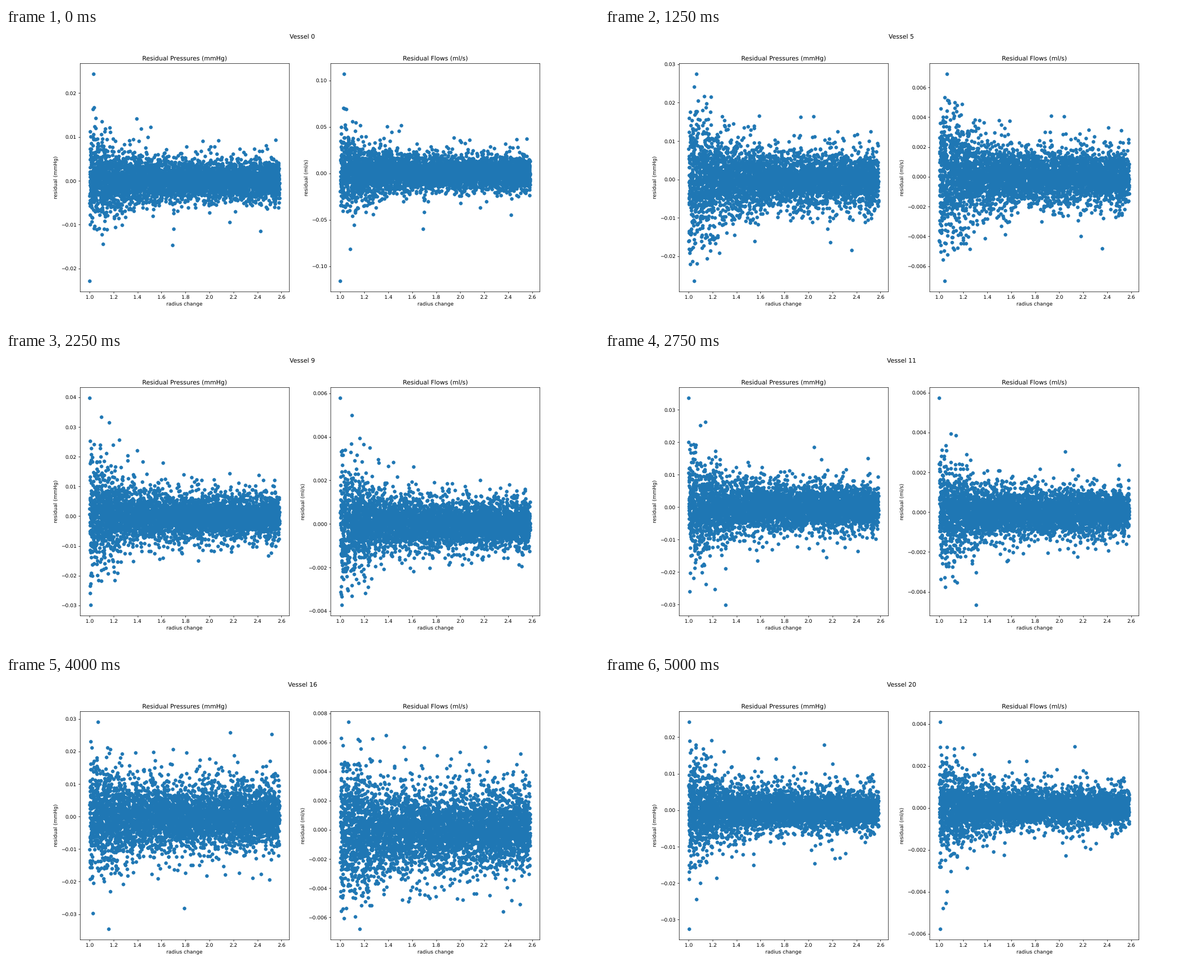
Recreate the animation shown at these times as a matplotlib script. Size 1058 by 529 pixels, loop 5250 ms.

```python
import numpy as np
import matplotlib.pyplot as plt
from matplotlib.animation import FuncAnimation

plt.rcParams["text.hinting"] = "no_hinting"

VESSELS = 21
POINTS = 4500
X_MAX = 2.5845
SCALES = {"p": 1e-4, "f": 1e-5}  # mmHg and ml/s per unit below

# Key vessels; every quantity runs geometrically between them.
KEYS = [0, 2, 5, 9, 13, 16, 20]
SPREAD_P = [19, 22, 29, 32, 27, 41, 23]
SPREAD_F = [800, 98, 75, 47, 50, 118, 37]
FLARE = [1.5, 0.8, 1.9, 1.6, 1.8, 0.9, 1.8]
# highest and lowest point as (x, pressure, flow)
HIGH = [(1.03, 244, 10710), (1.76, 184.5, 880), (1.063, 275, 690), (1.0, 398, 579),
        (1.0, 284, 568), (1.07, 291, 742), (1.005, 242, 410)]
LOW = [(1.0, -229, -11610), (2.32, -270, -1208), (1.045, -265, -700), (1.01, -299, -373),
       (1.695, -304, -583), (1.16, -346, -682), (1.005, -326, -578)]


def between(i, values):
    """Geometric interpolation over the key vessels, keeping the sign."""
    values = np.array(values, float)
    return np.sign(values[0]) * np.exp(np.interp(i, KEYS, np.log(np.abs(values))))


def residuals(noise, spread, high, low):
    """Scale the noise, pull far points inside the extremes, then add those."""
    y = spread * noise
    y = np.where((y > 0.9 * high) | (y < 0.9 * low), 0.5 * y, y)
    return np.append(y, [high, low])


x_base = np.random.default_rng(4).uniform(1, X_MAX, POINTS)


def vessel_data(i):
    rng = np.random.default_rng(100 + i)
    high_x, high_p, high_f = (between(i, col) for col in zip(*HIGH))
    low_x, low_p, low_f = (between(i, col) for col in zip(*LOW))
    width = 1 + between(i, FLARE) * np.exp(-(x_base - 1) / 0.25)
    z = rng.standard_t(7, POINTS)
    z_flow = 0.95 * z + 0.3 * rng.standard_normal(POINTS)
    x = np.append(x_base, [high_x, low_x])
    p = residuals(width * z, between(i, SPREAD_P), high_p, low_p)
    f = residuals(width * z_flow, between(i, SPREAD_F), high_f, low_f)
    return x, p * SCALES["p"], f * SCALES["f"]


data = [vessel_data(i) for i in range(VESSELS)]

fig, axes = plt.subplots(1, 2, figsize=(16, 8), dpi=66.125)
heading = fig.suptitle("Vessel 0")
clouds = []
for ax, name, unit in zip(axes, ("Pressures", "Flows"), ("mmHg", "ml/s")):
    clouds.append(ax.scatter([], [], s=36, color="#1f77b4"))
    ax.set_title(f"Residual {name} ({unit})")
    ax.set_xlabel("radius change")
    ax.set_ylabel(f"residual ({unit})")
    pad = 0.05 * (X_MAX - 1)
    ax.set_xlim(1 - pad, X_MAX + pad)


def update(i):
    x, *panels = data[i]
    heading.set_text(f"Vessel {i}")
    for ax, cloud, y in zip(axes, clouds, panels):
        cloud.set_offsets(np.column_stack([x, y]))
        pad = 0.05 * np.ptp(y)
        ax.set_ylim(y.min() - pad, y.max() + pad)
    return [heading, *clouds]


anim = FuncAnimation(fig, update, frames=VESSELS, interval=250, repeat=True, repeat_delay=0)
plt.show()
```
